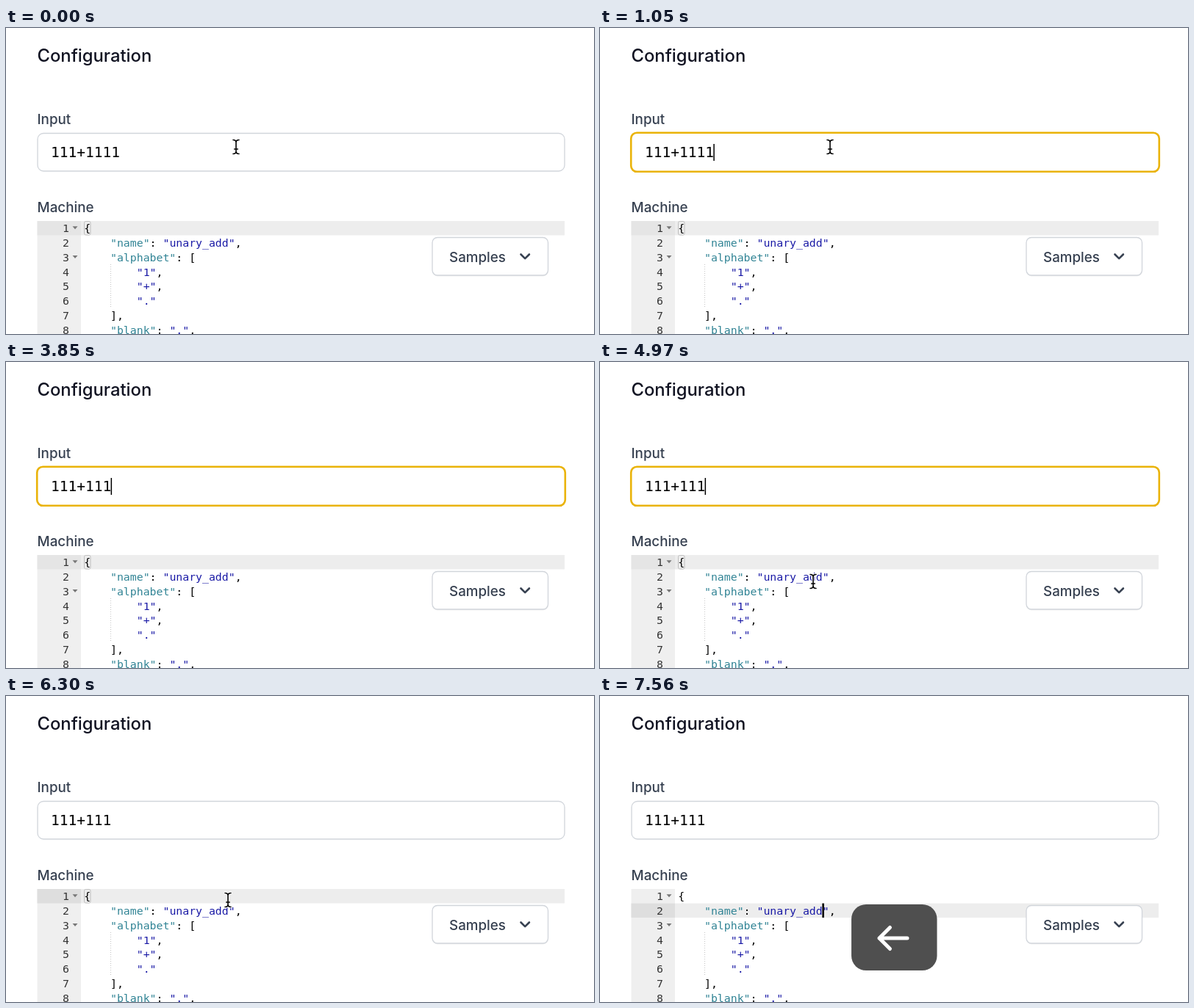
Recreate the animation shown at these times as an HTML page. Size 800 px wide and 417 px high, loop 8000 ms.

```html
<!DOCTYPE html>
<html lang="en">
<head>
<meta charset="utf-8">
<title>Machine configuration</title>
<style>
  html, body { margin: 0; width: 100%; height: 100%; overflow: hidden; background: #fff; }
  svg { display: block; width: 100vw; height: 100vh; }
  .ui { font-family: Inter, sans-serif; font-weight: 500; font-size: 18.8px; fill: #374151; }
  .title { font-size: 23.8px; fill: #111322; }
  .mono { font-family: "DejaVu Sans Mono", monospace; white-space: pre; }
  .code { font-size: 14.83px; fill: #000; }
  .key { fill: #318495; }
  .str { fill: #1a1aa6; }
  .num { fill: #333; text-anchor: end; }
  .arrow { fill: none; stroke: #fff; stroke-width: 5; stroke-linecap: round; stroke-linejoin: round; }
</style>
</head>
<body>
<svg viewBox="0 0 800 417" preserveAspectRatio="none">
  <text class="ui title" x="42.5" y="46">Configuration</text>
  <text class="ui" x="42.5" y="131">Input</text>
  <rect id="field" fill="#fff"/>
  <text class="mono" id="value" x="61" y="176" font-size="19.5"></text>
  <rect id="fieldCaret" y="158" width="1.5" height="23"/>
  <text class="ui" x="42.5" y="250.5">Machine</text>

  <rect x="42.5" y="263" width="59.5" height="154" fill="#efefef"/>
  <g id="active">
    <rect x="42.5" width="59.5" height="19.5" fill="#dedede"/>
    <rect x="102" width="658" height="19.5" fill="#ededed"/>
  </g>
  <path d="M142.5 322V382" stroke="#c4c4c4" stroke-dasharray="1 2"/>
  <path d="M90.5 270.3h7l-3.5 4zM90.5 310h7l-3.5 4z" fill="#777"/>
  <rect id="bracket" x="106.5" y="263.5" width="8.5" height="18.5" rx="2" fill="none" stroke="#c0c0c0"/>
  <g id="code"></g>
  <rect id="codeCaret" width="2.5" height="19.5"/>

  <rect x="580" y="286.5" width="158" height="52" rx="7" fill="#000" opacity=".05"/>
  <rect x="580" y="285.5" width="157.5" height="51.5" rx="7" fill="#fff" stroke="#d1d5db" stroke-width="1.3"/>
  <text class="ui" x="603" y="319">Samples</text>
  <path d="M700.5 308.5l5.7 5.7l5.7-5.7" fill="none" stroke="#374151" stroke-width="2.6" stroke-linecap="round" stroke-linejoin="round"/>

  <g id="overlay">
    <rect id="plate" y="284" height="90" rx="20" fill="#4f4f4f"/>
    <path id="glyph" class="arrow"/>
  </g>
  <circle id="ripple" fill="none" stroke="#5f98df" stroke-width="1.6"/>
  <g id="cursor" fill="none" stroke-linecap="round">
    <path d="M-4-9.5Q0-9.5 0-6Q0-9.5 4-9.5M0-6V6M-4 9.5Q0 9.5 0 6Q0 9.5 4 9.5M-2.3 3H2.3" stroke="#fff" stroke-width="3.4"/>
    <path d="M-4-9.5Q0-9.5 0-6Q0-9.5 4-9.5M0-6V6M-4 9.5Q0 9.5 0 6Q0 9.5 4 9.5M-2.3 3H2.3" stroke="#000" stroke-width="1.6"/>
  </g>
</svg>
<script>
const LOOP = 8000, ROW = 19.85, COL = 8.93, TEXT_X = 106.3;
const FOCUS = 700, ERASE = 3710, MOVE = 4620, BLUR = 5530, DOWN = 6580, END = 7210, LEFT = 7420, LEFT2 = 7560;
const $ = id => document.getElementById(id);
const set = (id, attrs) => { for (const k in attrs) $(id).setAttribute(k, attrs[k]); };
const show = (id, on) => set(id, { visibility: on ? "visible" : "hidden" });
const clamp = v => Math.min(1, Math.max(0, v));
const ease = v => { v = clamp(v); return v * v * (3 - 2 * v); };
const mix = (a, b, p) => a + (b - a) * p;
const within = (t, a, b) => t >= a && t < b;

const lines = [
  "{", '    "name": "unary_add",', '    "alphabet": [', '        "1",',
  '        "+",', '        "."', "    ],", '    "blank": ".",'
];

function paint(line) {
  return line.replace(/"[^"]*"(:?)/g, (s, colon) => {
    const word = colon ? s.slice(0, -1) : s;
    return `<tspan class="${colon ? "key" : "str"}">${word}</tspan>${colon}`;
  });
}

$("code").innerHTML = lines.map((line, i) => {
  const y = 278 + ROW * i, indent = line.search(/\S/);
  return `<text class="mono code num" x="86" y="${y}">${i + 1}</text>` +
    `<text class="mono code" x="${TEXT_X + indent * COL}" y="${y}">${paint(line.trim())}</text>`;
}).join("");

function drawField(t) {
  const f = clamp((t - FOCUS) / 150) * (1 - clamp((t - BLUR) / 150));
  const grey = [209, 213, 219], gold = [234, 179, 8];
  set("field", {
    x: mix(43, 42.2, f), y: mix(143.5, 142.7, f),
    width: mix(717, 718.6, f), height: mix(51.5, 53.1, f), rx: 8,
    stroke: `rgb(${grey.map((c, i) => Math.round(mix(c, gold[i], f)))})`,
    "stroke-width": mix(1.3, 2.6, f)
  });
  const value = t < ERASE ? "111+1111" : "111+111";
  if ($("value").textContent !== value) $("value").textContent = value;
  const hidden = [[1260, 1890], [2520, 3080], [3570, ERASE], [4200, 4690], [5250, BLUR]];
  show("fieldCaret", within(t, FOCUS, BLUR) && !hidden.some(([a, b]) => within(t, a, b)));
  set("fieldCaret", { x: 60.4 + value.length * 11.74 });
}

function drawEditor(t) {
  const row = t < DOWN ? 0 : 1;
  const col = t < END ? 1 : t < LEFT ? 24 : t < LEFT2 ? 23 : 22;
  set("active", { transform: `translate(0 ${263 + row * (ROW - 0.3)})` });
  $("active").firstElementChild.setAttribute("opacity", t < BLUR ? 0.55 : 1);
  set("codeCaret", { x: TEXT_X + col * COL - 0.4, y: 263 + row * (ROW - 0.3) });
  show("codeCaret", t >= BLUR && !within(t, 6160, DOWN) && !within(t, 7070, END));
  show("bracket", t < END);
}

function drawOverlay(t) {
  show("overlay", t >= DOWN);
  const down = t < END, w = down ? 109 : 116.5;
  const turn = down ? 0 : t < LEFT ? -90 : 90;
  set("plate", { x: 400.3 - w / 2, width: w });
  set("glyph", {
    d: down ? "M0-18V19M-15 4L0 19L15 4" : "M0-18V20M-14.5 5.5L0 20L14.5 5.5",
    transform: `translate(400 330) rotate(${turn})`
  });
  set("overlay", { opacity: down ? 1 - clamp((t - 6980) / 120) : 1 });
}

function drawPointer(t) {
  const away = ease((t - MOVE) / 330), back = ease((t - 4980) / 420);
  const x = mix(mix(313, 290, away), 302, back);
  const y = mix(mix(162, 299, away), 278, back);
  set("cursor", { transform: `translate(${x} ${y})` });
  show("cursor", t < ERASE || within(t, MOVE, DOWN));

  const start = t < BLUR ? FOCUS : BLUR, p = (t - start) / 320;
  show("ripple", p >= 0 && p < 1);
  if (p >= 0 && p < 1) {
    set("ripple", { cx: x, cy: y, r: 41 * (1 - (1 - p) ** 2.5), opacity: 1 - p ** 3 });
  }
}

function frame(now) {
  const t = now % LOOP;
  drawField(t);
  drawEditor(t);
  drawOverlay(t);
  drawPointer(t);
  requestAnimationFrame(frame);
}
frame(0);
</script>
</body>
</html>
```
